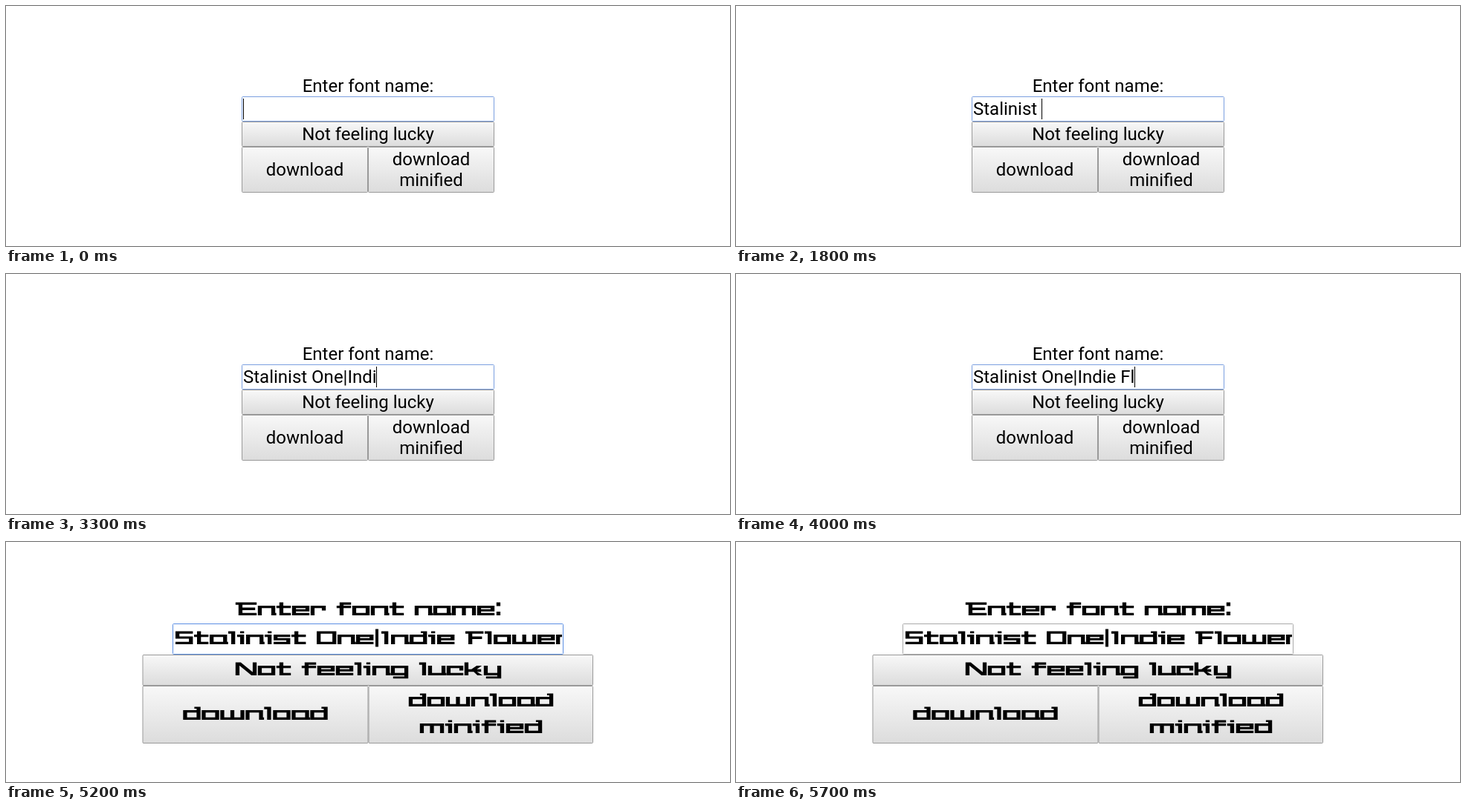
Recreate the animation shown at these times as an HTML page. Size 974 px wide and 324 px high, loop 8000 ms.

```html
<!DOCTYPE html>
<html lang="en">
<head>
<meta charset="utf-8">
<title>Font picker</title>
<style>
  html, body { margin: 0; width: 100%; height: 100%; overflow: hidden; background: #fff; }
  svg { display: block; width: 974px; height: 324px; }
  text { font: 24px Roboto, sans-serif; white-space: pre; }
</style>
</head>
<body>
<svg id="stage" viewBox="0 0 974 324">
  <defs>
    <linearGradient id="face" x1="0" y1="0" x2="0" y2="1">
      <stop offset="0" stop-color="#f8f8f8"/>
      <stop offset="1" stop-color="#dcdcdc"/>
    </linearGradient>
    <clipPath id="field"><rect x="226" y="111" width="522" height="40"/></clipPath>
  </defs>
  <rect width="974" height="324" fill="#fff"/>
  <g id="plain"></g>
  <g id="styled"></g>
</svg>
<script>
const LOOP = 8000, STYLED = 5200, BLUR = 5700, CARET_OFF = 5100;
const PHRASE = 'Stalinist One|Indie Flower';
const TYPED = [300, 600, 800, 1000, 1200, 1300, 1500, 1600, 1700, 1800, 2000, 2100, 2300,
  2500, 2800, 3000, 3200, 3300, 3500, 3600, 3800, 4000, 4200, 4300, 4400, 4500];

const plain = document.getElementById('plain');
const styled = document.getElementById('styled');

function add(parent, tag, attrs, content = '') {
  const node = document.createElementNS('http://www.w3.org/2000/svg', tag);
  for (const key in attrs) node.setAttribute(key, attrs[key]);
  node.textContent = content;
  parent.appendChild(node);
  return node;
}

function box(parent, x, y, right, bottom, fill, stroke) {
  return add(parent, 'rect', {
    x: x + .5, y: y + .5, width: right - x - 1, height: bottom - y - 1, rx: 1, fill, stroke
  });
}

const button = (parent, ...edges) => box(parent, ...edges, 'url(#face)', '#999');
const label = (x, y, str) => add(plain, 'text', { x, y, 'text-anchor': 'middle' }, str);

// Wide slab lettering, assembled from bars and stems
const X = 13, CAP = 17.5, BAR = 3.3, STEM = 5.3, IN = 4;
const bar = (x, y, w, h) => `M${x} ${y}h${w}v${h}h${-w}z`;

const parts = {
  T: (w, h) => bar(0, -h, w, BAR),
  M: (w, h) => bar(0, -(h + BAR) / 2, w, BAR - .4),
  B: w => bar(0, -BAR, w, BAR),
  m: (w, h) => bar(IN, -(h + BAR) / 2, w - IN - 2, BAR),
  b: w => bar(IN, -BAR, w - IN, BAR),
  L: (w, h) => bar(0, -h, STEM, h),
  R: (w, h) => bar(w - STEM, -h, STEM, h),
  J: (w, h) => bar((w - STEM) / 2, -h, STEM, h),
  l: (w, h) => bar(0, -h, STEM, h / 2),
  r: (w, h) => bar(w - STEM, -h, STEM, h / 2),
  q: (w, h) => bar(w - STEM, -h / 2, STEM, h / 2),
  i: (w, h) => bar(IN, -h, STEM, h),
  s: (w, h) => bar(0, -h, IN + 1, BAR),
  A: () => bar(0, -CAP, STEM, CAP),
  I: () => bar(IN, -CAP, STEM, CAP),
  D: w => bar(w - STEM, -CAP, STEM, CAP) + bar(w - STEM - 3, -CAP, 4, 2.6),
  F: w => bar(IN, -CAP, w - IN, BAR),
  d: () => bar(IN, -CAP, STEM, 2.8),
  G: w => bar(w - STEM, -1, STEM, 5) + bar(3, 1.4, w - 3, 2.8),
  z: w => bar(w - STEM, -BAR, STEM + 1.4, BAR),
  N: (w, h) => `M0 ${-h}h7L${w} 0h-7z`,
  K: w => `M9 -8L${w - 8} ${-X}H${w - 1}L14 -6.5L${w} 0H${w - 7}z`,
  P: () => bar(1, -CAP - 3, 4, 24),
  C: () => bar(1, -CAP, STEM, 5) + bar(1, -5, STEM, 5)
};

// Advance width, then the parts
const glyphs = {
  E: [30, 'Timb'], F: [26, 'Tim'], I: [13, 'si'], N: [30, 'LRN'], O: [28, 'TBLR'], S: [25, 'TlMqB'],
  a: [25, 'TBLRz'], c: [24, 'TLBr'], d: [25, 'TBLRD'], e: [25, 'TLMBr'], f: [21, 'TIF'],
  g: [25, 'TBLRG'], i: [12, 'sid'], k: [26, 'AmK'], l: [12, 'si'], m: [34, 'TLRJ'],
  n: [25, 'TLRz'], o: [25, 'TBLR'], r: [22, 'TLr'], s: [24, 'TlMqB'], t: [21, 'TIb'],
  u: [25, 'BLRz'], w: [34, 'BLRJ'], y: [25, 'BLRG'], ' ': [13, ''], '|': [9, 'P'], ':': [8, 'C']
};

function letter(parent, str, x, y, middle) {
  const width = [...str].reduce((sum, c) => sum + glyphs[c][0], 0);
  let pen = middle ? x - (width - 1.6) / 2 : x;
  const group = add(parent, 'g', { role: 'img', 'aria-label': str });
  for (const c of str) {
    const [advance, names] = glyphs[c];
    const height = /[A-Zl]/.test(c) ? CAP : X;
    const d = [...names].map(p => parts[p](advance - 1.6, height)).join('');
    if (d) add(group, 'path', { d, transform: `translate(${pen} ${y})` });
    pen += advance;
  }
}

box(plain, 317, 122, 657, 156, '#fff', '#7b9fe0');
button(plain, 317, 156, 657, 190);
button(plain, 317, 190, 487, 252);
button(plain, 487, 190, 657, 252);
label(487, 116, 'Enter font name:');
label(487, 181, 'Not feeling lucky');
label(402, 229, 'download');
label(572, 215, 'download');
label(572, 243, 'minified');
const entry = add(plain, 'text', { x: 319, y: 147 });
const caret = add(plain, 'rect', { y: 125, width: 1, height: 28 });

const frame = box(styled, 224, 110, 750, 152, '#fff', '#5b8fe3');
button(styled, 183.5, 152, 790, 194);
button(styled, 183.5, 194, 487.5, 272);
button(styled, 487.5, 194, 790, 272);
letter(styled, 'Enter font name:', 487, 99, true);
letter(add(styled, 'g', { 'clip-path': 'url(#field)' }), PHRASE, 228, 138);
letter(styled, 'Not feeling lucky', 487.5, 180, true);
letter(styled, 'download', 335.5, 240, true);
letter(styled, 'download', 639, 222, true);
letter(styled, 'minified', 639, 258, true);

const ruler = document.createElement('canvas').getContext('2d');
ruler.font = '24px Roboto, sans-serif';

function draw(t) {
  const done = t >= STYLED;
  plain.setAttribute('display', done ? 'none' : 'inline');
  styled.setAttribute('display', done ? 'inline' : 'none');
  const value = PHRASE.slice(0, TYPED.filter(at => at <= t).length);
  entry.textContent = value;
  caret.setAttribute('x', Math.floor(319 + ruler.measureText(value).width));
  caret.setAttribute('opacity', t < CARET_OFF ? 1 : 0);
  frame.setAttribute('stroke', t < BLUR ? '#5b8fe3' : '#aaa');
}

const start = performance.now();
function tick() {
  draw((performance.now() - start) % LOOP);
  requestAnimationFrame(tick);
}
tick();
</script>
</body>
</html>
```
